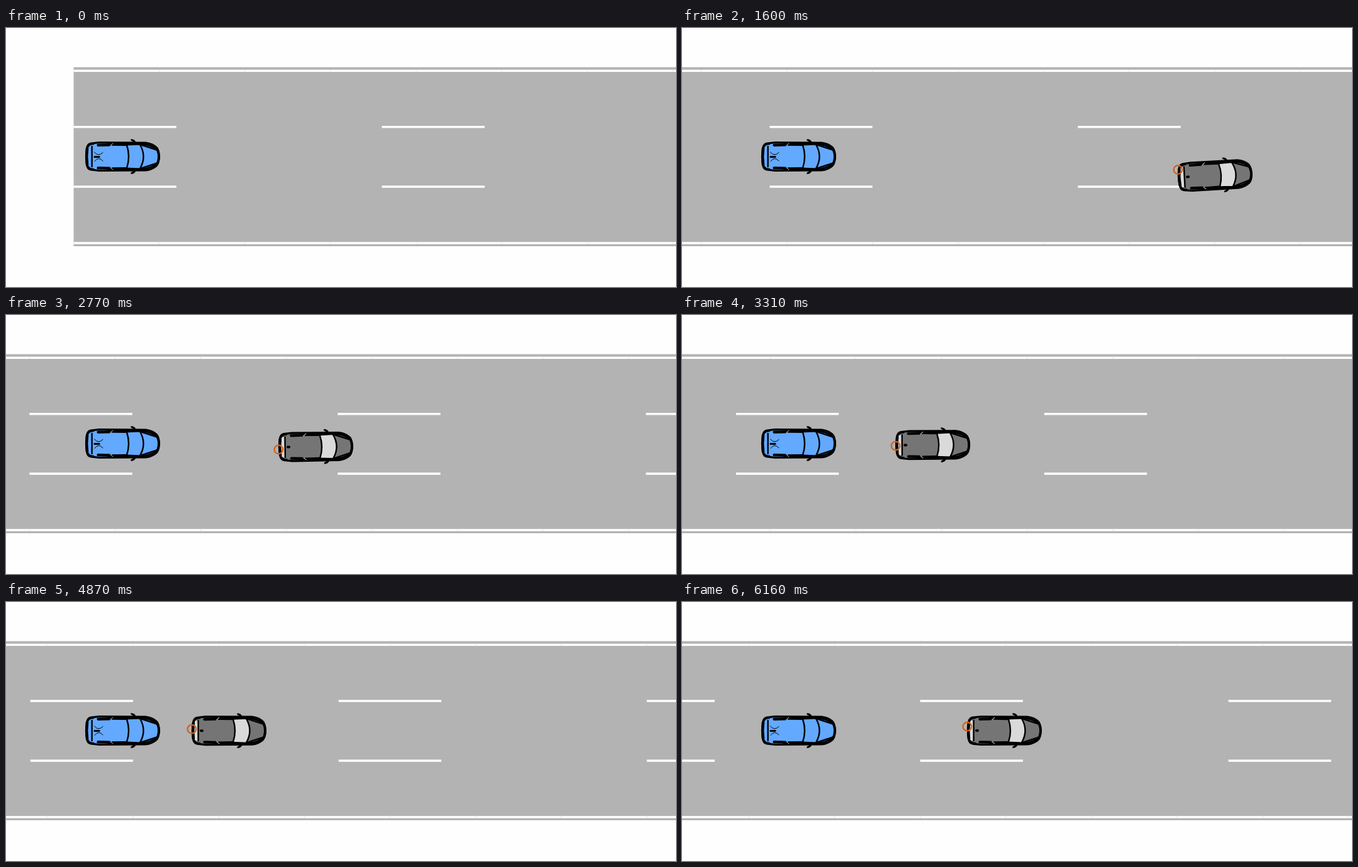
Animation, 1065 px wide and 413 px high, one loop 6260 ms. Source, as an HTML page with a canvas:

```html
<!DOCTYPE html>
<html lang="en">
<head>
<meta charset="utf-8">
<title>Cut-in on a motorway</title>
<style>
  html, body { margin: 0; width: 100%; height: 100%; overflow: hidden; background: #fefefe; }
  canvas { display: block; }
</style>
</head>
<body>
<canvas id="stage" width="1065" height="413"></canvas>
<script>
const ctx = document.getElementById('stage').getContext('2d');
const W = 1065, H = 413, LOOP = 6260;
const METRE = 27.22, ROAD_X = 107.5, LANE_Y = 205, EGO_X = 126;

// Redraw times: every 120 ms, with a longer hold after these moments
const longHolds = new Set([550, 820, 1330, 1840, 1990, 2620, 2770, 2920,
  3310, 3580, 3730, 4240, 4870, 5380, 5770]);
const ticks = [];
for (let t = 430; t < LOOP; t += longHolds.has(t) ? 150 : 120) ticks.push(t);

// time, distance of own car, distance of lead car, sideways offset of the detection
const track = [
  [310, 0, 1419, -9],
  [820, 592.5, 1738, -9],
  [1600, 1438, 2226, -9],
  [1840, 1669.5, 2368, -6],
  [2620, 2404, 2868, 3],
  [2770, 2520, 2953, 4.5],
  [3730, 3280.5, 3571, -1],
  [4000, 3464.5, 3738.5, -2.5],
  [4870, 3988.5, 4283.5, -2.5],
  [6160, 4628.5, 5081.5, -6.5]
];
const BRAKE = 0.00006;

function stateAt(t) {
  let i = 0;
  while (i < track.length - 2 && t > track[i + 1][0]) i++;
  const a = track[i], b = track[i + 1];
  const k = (t - a[0]) / (b[0] - a[0]);
  const mix = n => a[n] + (b[n] - a[n]) * k;
  const own = mix(1) + BRAKE * (t - a[0]) * (b[0] - t);
  return { own, leadX: mix(2) - own, ring: mix(3) };
}

function rect(x, y, w, h, color) {
  ctx.fillStyle = color;
  ctx.fillRect(x, y, w, h);
}

function stroke(d, width, color = '#000') {
  ctx.lineWidth = width;
  ctx.strokeStyle = color;
  ctx.stroke(new Path2D(d));
}

function fill(d, color) {
  ctx.fillStyle = color;
  ctx.fill(new Path2D(d));
}

function drawRoad(own) {
  const left = Math.max(0, ROAD_X - own);
  rect(left, 62.5, W - left, 285.5, '#b3b3b3');
  rect(left, 66.5, W - left, 3.5, '#fff');
  rect(left, 341.2, W - left, 3.5, '#fff');

  const repeat = (period, draw) => {
    const first = Math.max(0, Math.floor((own - ROAD_X) / period) - 1);
    for (let i = first; ; i++) {
      const x = ROAD_X - own + i * period;
      if (x > W) break;
      draw(x);
    }
  };
  repeat(18 * METRE, x => {
    for (const y of [156, 251.3]) rect(x, y, 6 * METRE, 3.5, '#fff');
  });
  repeat(5 * METRE, x => {
    for (const y of [66.5, 341.2]) rect(x - 0.5, y, 1, 3.5, '#e4e4e4');
  });
}

const BODY = 'M2.5 -13 Q3.5 -20 9 -21 L22 -22.3 L96 -22 Q108 -20.5 114 -13.5 Q117 -9 117 0' +
  ' Q117 9 114 13.5 Q108 20.5 96 22 L22 22.3 L9 21 Q3.5 20 2.5 13 Q0.5 0 2.5 -13 Z';
const SCREEN = 'M66 -19 Q72 0 66 19 L87 20 Q98 0 87 -20 Z';

// Origin is the middle of the rear bumper
function drawCar(x, y, angle, paint, glass, own) {
  ctx.save();
  ctx.translate(x + 59, y);
  ctx.rotate(angle);
  ctx.translate(-59, 0);
  ctx.lineCap = ctx.lineJoin = 'round';

  fill(BODY, paint);
  fill(SCREEN, glass);
  rect(4, -16, 6, 32, glass);
  stroke(BODY, 3.2);
  stroke('M3 -13 Q1.2 0 3 13', 4.5);
  stroke('M10.6 -16 V16', 2.4);
  stroke('M66 -18 Q72 0 66 18', 2.4);
  stroke('M87 -19 Q98 0 87 19', 2.4);
  stroke('M112 -15 Q117 -9 117 0 Q117 9 112 15', 4);

  for (const side of [1, -1]) {
    ctx.save();
    ctx.scale(1, side);
    stroke('M4 -15 Q6 -20 13 -20', 2.6);
    stroke('M20.5 -18.2 L39 -18.6', 4.2);
    stroke('M43 -19 L64 -18.6', 3.4);
    stroke('M36 -21 L82 -21.3', 2.6);
    stroke('M64 -19 L88 -20 Q101 -20 112 -13', 3);
    stroke('M88 -19 L114 -10.5', 2.4);
    stroke('M39.5 -17 L44 -21', 1, '#bbb');
    fill('M72 -27.5 Q77 -28.5 80 -24 L80 -21 L77 -21 Q76.5 -24.5 73 -25 Z', '#000');
    ctx.restore();
  }

  if (own) {
    stroke('M15 0.5 H22', 3.2);
    stroke('M14.5 -7 Q21 1 28 -6.5 M15 7.5 Q21 -1 28 7', 1);
    rect(115, -3, 4, 6, '#000');
  } else {
    stroke('M15 0 H17', 4);
  }
  ctx.restore();
}

function drawRing(x, y) {
  ctx.beginPath();
  ctx.arc(x, y, 6.8, 0, 2 * Math.PI);
  ctx.lineWidth = 2.3;
  ctx.strokeStyle = '#d4621c';
  ctx.stroke();
}

function draw(t) {
  const { own, leadX, ring } = stateAt(t);
  rect(0, 0, W, H, '#fefefe');
  drawRoad(own);
  drawCar(EGO_X, LANE_Y, 0, '#63a9ff', '#63a9ff', true);
  if (leadX > W + 10) return;

  // The lead car settles into the lane
  const drift = Math.exp((1600 - t) / 653);
  const y = LANE_Y + 30 * drift;
  drawCar(leadX, y, -0.056 * drift ** 0.8, '#757575', '#dadada', false);
  drawRing(leadX + 0.3, y + ring);
}

const start = performance.now();
function loop() {
  const now = (performance.now() - start) % LOOP;
  let t = track[0][0];
  for (const tick of ticks) if (tick <= now) t = tick;
  draw(t);
  requestAnimationFrame(loop);
}
loop();
</script>
</body>
</html>
```
